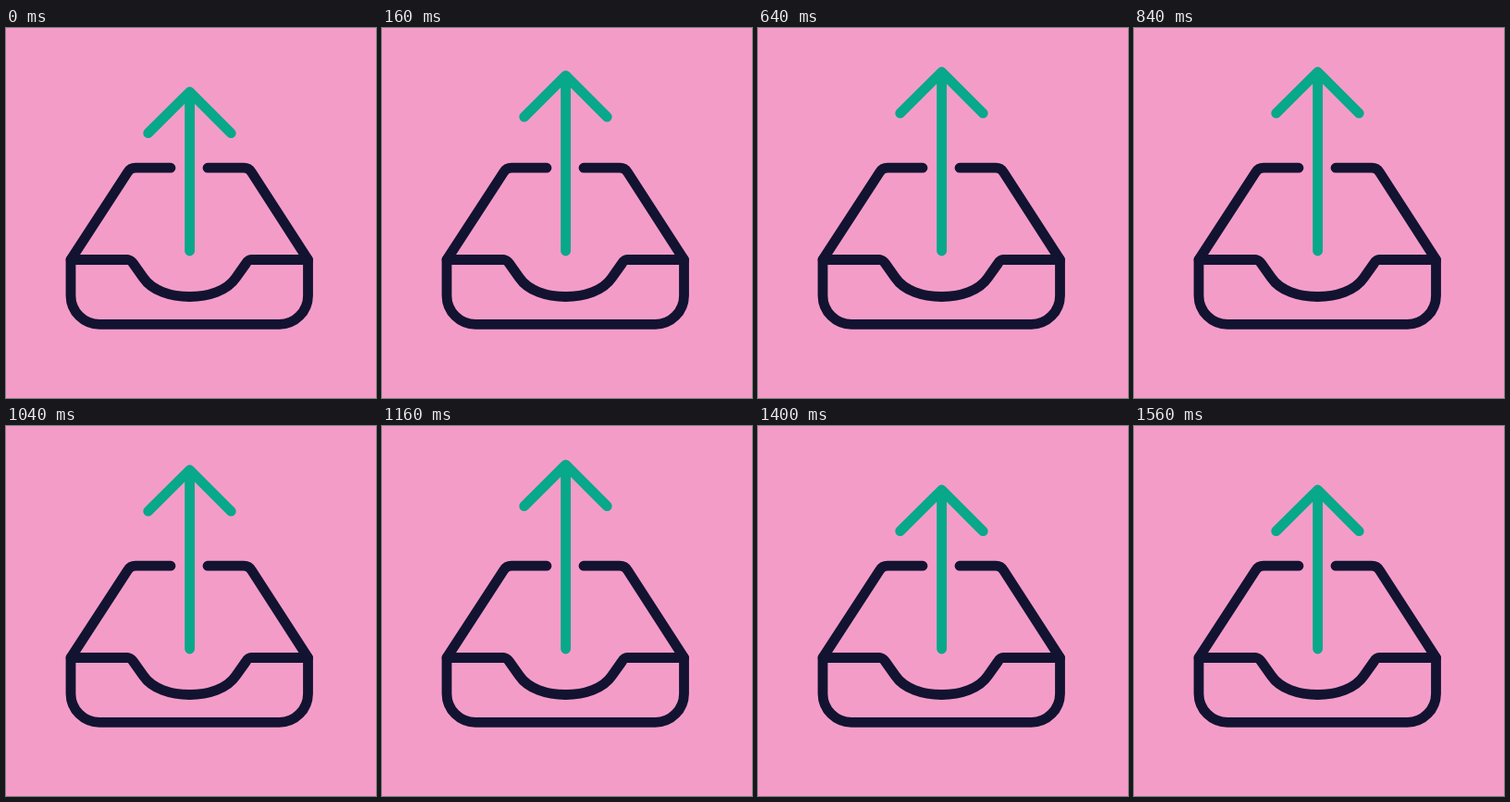
These frames come from a looping animation (400x400 px, 1640 ms). An HTML page:

```html
<!DOCTYPE html>
<html lang="en">
<head>
<meta charset="utf-8">
<title>Outbox</title>
<style>
  html, body { margin: 0; width: 100%; height: 100%; overflow: hidden; background: #f49cc8; }
  svg { display: block; width: 100%; height: 100%; }
  path { fill: none; stroke-width: 10.8; stroke-linecap: round; stroke-linejoin: round; }
  .tray { stroke: #121331; }
  #arrow { stroke: #08a88a; }
</style>
</head>
<body>
<svg viewBox="0 0 400 400">
  <path class="tray" d="M178 151.2H140Q134.5 151.2 131.5 156L70 250.5M218 151.2H257Q262.500 151.2 265.500 156L326.500 250.5"/>
  <path class="tray" d="M70 250.5H132Q135 251 137.500 254.500L148.500 270C158 284 178 290.500 198.500 290.500S239 284 248.500 270L259.500 254.500Q262 250.500 265 250.500H326.500V289.500A31 31 0 0 1 295.500 320.300H101A31 31 0 0 1 70 289.500Z"/>
  <path id="arrow"/>
</svg>
<script>
  const LOOP = 1640, STEP = 40;
  const REST = 69, PEAK = 40, HOLD = 47.5;
  const arrow = document.getElementById('arrow');

  // [time in ms, height of the arrow tip]
  const keys = [
    [20, REST], [265, PEAK], [385, HOLD],
    [1040, HOLD], [1125, PEAK], [1350, REST]
  ];

  const ease = u => u * u * (3 - 2 * u);

  function tipAt(t) {
    const i = keys.findIndex(k => t < k[0]);
    if (i < 1) return REST;
    const [t0, y0] = keys[i - 1], [t1, y1] = keys[i];
    return y0 + (y1 - y0) * ease((t - t0) / (t1 - t0));
  }

  function draw(t) {
    const y = tipAt(t), barb = y + 44.7;
    arrow.setAttribute('d', `M198.6 241V${y}M153.700 ${barb}L198.600 ${y}L243.300 ${barb}`);
  }

  let start;
  function tick(now) {
    start ??= now;
    const t = (now - start) % LOOP;
    draw(Math.floor(t / STEP) * STEP);
    requestAnimationFrame(tick);
  }

  draw(0);
  requestAnimationFrame(tick);
</script>
</body>
</html>
```
